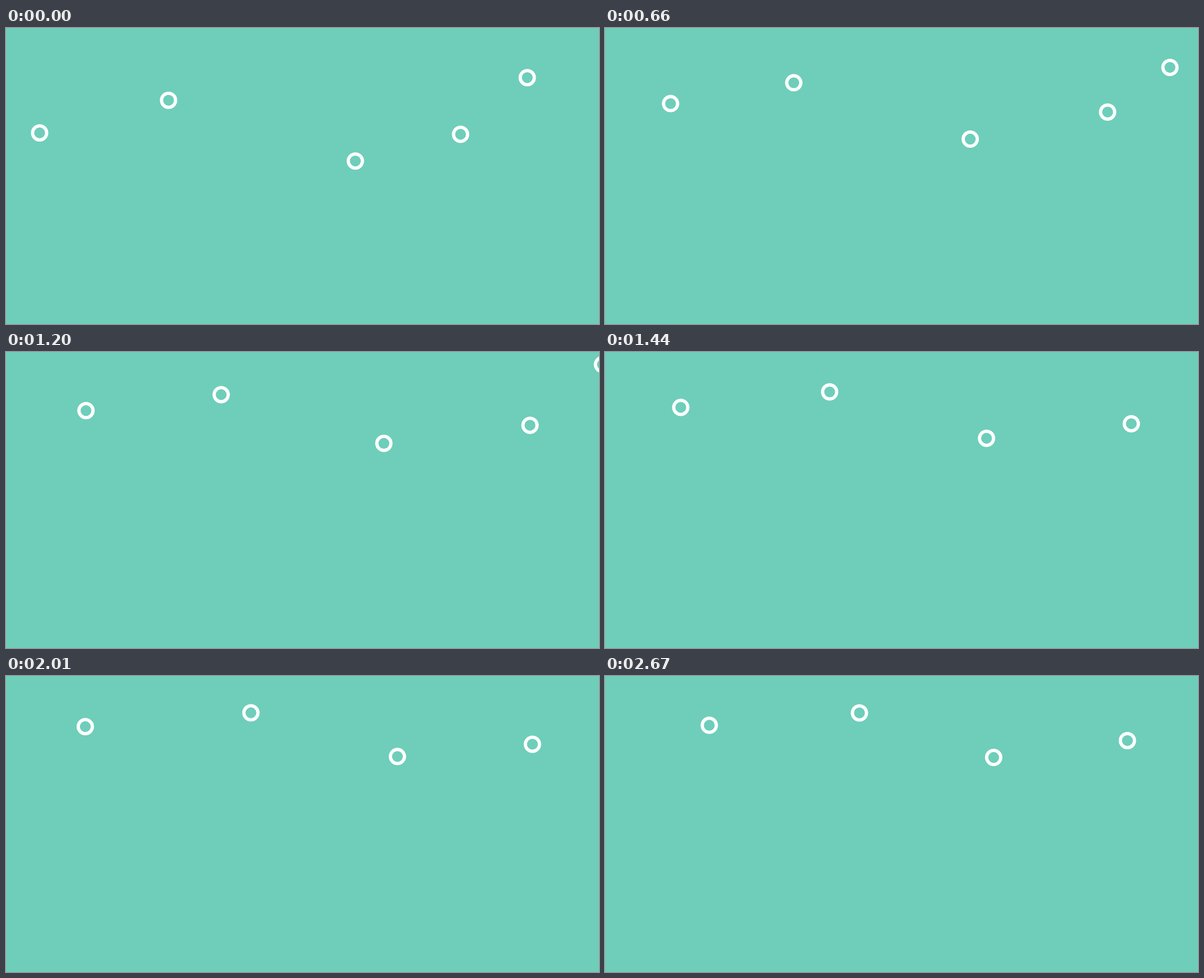
An HTML page for the animation above (2700 ms loop, 1058 px wide and 529 px high).

```html
<!DOCTYPE html>
<html lang="en">
<head>
<meta charset="utf-8">
<title>Drifting rings</title>
<style>
  html, body { margin: 0; height: 100%; overflow: hidden; background: #6eceba; }
  svg { display: block; width: 100vw; height: 100vh; }
  circle { fill: none; stroke: #fff; stroke-width: 5.8; }
</style>
</head>
<body>
<svg id="stage" viewBox="0 0 1058 529"></svg>
<script>
const LOOP = 2700, STEP = 30, BEAT = 540;

// Each ring glides through one waypoint per beat.
const paths = [
  [[60, 187.5], [107.5, 143.8], [142.5, 109.3], [132, 95.7], [148.5, 89.3], [188.3, 88]],
  [[290, 129.2], [326.7, 103.5], [374.7, 79.7], [412.6, 68.7], [444, 65.3], [454.5, 66]],
  [[623.3, 237.7], [646.2, 206.8], [670.2, 169.2], [685.5, 149.2], [701, 143.2], [693, 145.7]],
  [[811, 190], [884, 156.3], [930, 133.6], [940.2, 126.5], [938, 120.3], [931.7, 115.2]],
  [[930, 88.7], [995, 77.3], [1051, 35.3], [1112, -30]]
];

const rings = paths.map(() => {
  const ring = document.createElementNS("http://www.w3.org/2000/svg", "circle");
  ring.setAttribute("r", 12.6);
  return stage.appendChild(ring);
});

// Waypoint coordinate; beyond either end the path continues straight.
function waypoint(path, i, axis) {
  const end = Math.max(0, Math.min(i, path.length - 1));
  const inner = end ? end - 1 : 1;
  return path[end][axis] + Math.abs(i - end) * (path[end][axis] - path[inner][axis]);
}

// Catmull-Rom curve through the waypoints.
function glide(path, beat, axis) {
  const i = Math.floor(beat), u = beat - i;
  const [a, b, c, d] = [-1, 0, 1, 2].map(k => waypoint(path, i + k, axis));
  return b + u / 2 * (c - a + u * (2 * a - 5 * b + 4 * c - d + u * (3 * (b - c) + d - a)));
}

function draw() {
  const time = Math.floor(performance.now() % LOOP / STEP) * STEP;
  rings.forEach((ring, i) => {
    ring.setAttribute("cx", glide(paths[i], time / BEAT, 0));
    ring.setAttribute("cy", glide(paths[i], time / BEAT, 1));
  });
  requestAnimationFrame(draw);
}
draw();
</script>
</body>
</html>
```
